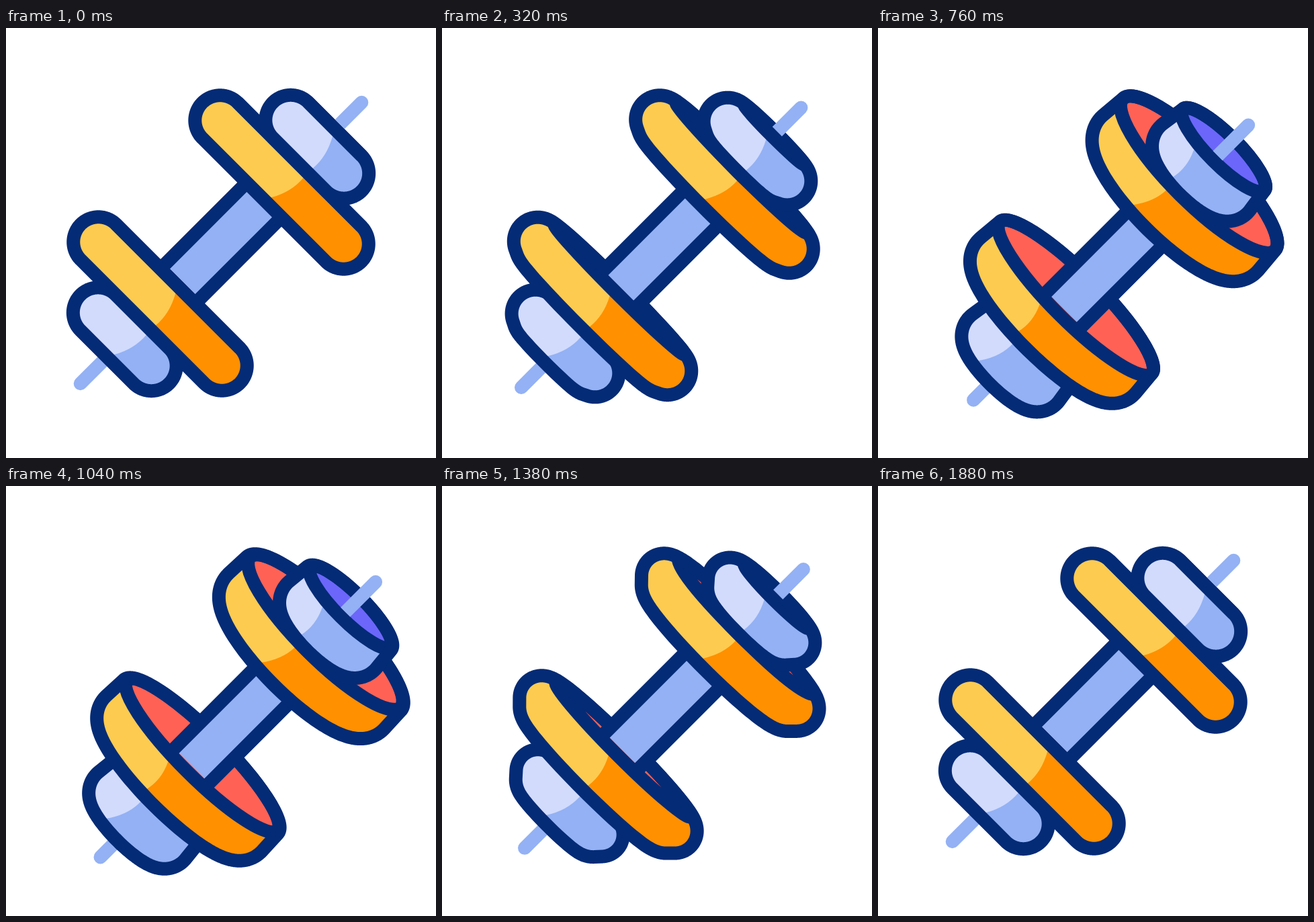
Animation of 640x640 px, one loop 2.4 s. Source, as an HTML page with a canvas:

```html
<!DOCTYPE html>
<html lang="en">
<head>
<meta charset="utf-8">
<title>Dumbbell</title>
<style>
  html, body { margin: 0; width: 100%; height: 100%; overflow: hidden; background: #fff; }
  canvas { display: block; }
</style>
</head>
<body>
<canvas id="stage" width="640" height="640"></canvas>
<script>
const ctx = document.getElementById('stage').getContext('2d');
const LOOP = 2400, TURNED = 800, BACK = 1880;
const SHIFT = 39.5, LINE = 20, R = 37.3;   // R: corner radius of a plate seen from the side
const NAVY = '#042b76', BLUE = '#93b1f4', PALE = '#d2dbfc';
const YELLOW = '#fdcb50', ORANGE = '#ff9000', RED = '#ff6254', PURPLE = '#6c66fb';

// u runs along the bar, v across it.
// u: centre seen from the side, h: half length without the corners,
// back: rear edge when turned, tilt: width / height of the turned discs
const small = { h: 56, light: PALE, dark: BLUE };
const big = { h: 130, light: YELLOW, dark: ORANGE, face: RED };
const smallLeft = { ...small, u: -202.6, back: -257, tilt: 0.22, slant: 13 };
const bigLeft = { ...big, u: -128, back: -181.5, tilt: 0.22, slant: -13 };
const bigRight = { ...big, u: 128, back: 71.5, tilt: 0.26, slant: 13 };
const smallRight = { ...small, u: 202.6, back: 142.5, tilt: 0.26, slant: -13, face: PURPLE };

const mix = (a, b, p) => a + (b - a) * p;

// How far an ellipse at u, grown by r, reaches along a direction, and where
function reach(disc, nu, nv) {
  const s = Math.hypot(disc.w * nu, disc.h * nv) + 1e-6;
  return {
    far: disc.u * nu + s + disc.r,
    u: disc.u + disc.w ** 2 * nu / s + disc.r * nu,
    v: disc.h ** 2 * nv / s + disc.r * nv
  };
}

// Convex outline around two discs
function hull(a, b) {
  const path = new Path2D(), n = 480;
  for (let i = 0; i < n; i++) {
    const angle = (i + 0.5) * 2 * Math.PI / n;
    const nu = Math.cos(angle), nv = Math.sin(angle);
    const p = reach(a, nu, nv), q = reach(b, nu, nv);
    const best = p.far > q.far ? p : q;
    path.lineTo(best.u, best.v);
  }
  path.closePath();
  return path;
}

function drawPlate(plate, p) {
  const left = mix(plate.u - R, plate.back, p);
  const rim = left + 2 * R - 4 * p;
  const tilt = plate.tilt * p;
  const rear = { h: plate.h * (1 - 0.03 * p), r: R };
  rear.w = rear.h * tilt;
  rear.u = left + R + rear.w;
  const front = { h: plate.h + 0.8 * R * p, r: R * (1 - p * p) };
  front.w = front.h * tilt;
  front.u = rim - front.r + front.w;

  const body = hull(rear, front);
  ctx.fillStyle = plate.dark;
  ctx.fill(body);
  drawLight(plate, body, left + LINE / 2, rim - LINE / 2, p);

  if (plate.face) {
    ctx.beginPath();
    ctx.ellipse(rim + front.w, 0, front.w, front.h, 0, 0, 2 * Math.PI);
    ctx.fillStyle = plate.face;
    ctx.fill();
    ctx.stroke();
  }
  ctx.stroke(body);
}

// The lit half ends in a shallow arc that stays put while the plate shifts
function drawLight(plate, body, u1, u2, p) {
  const mid = 11.5 - SHIFT * p, rise = (plate.slant + 7 * p) / 2;
  ctx.save();
  ctx.clip(body);
  ctx.beginPath();
  ctx.moveTo(u1 - 60, -200);
  ctx.lineTo(u1 - 60, mid - rise);
  ctx.lineTo(u1, mid - rise);
  ctx.quadraticCurveTo((u1 + u2) / 2, mid + 9, u2, mid + rise);
  ctx.lineTo(u2 + 120, mid + rise);
  ctx.lineTo(u2 + 120, -200);
  ctx.fillStyle = plate.light;
  ctx.fill();
  ctx.restore();
}

function drawPin(base, tip) {
  ctx.beginPath();
  ctx.moveTo(base, -10);
  ctx.lineTo(tip, -10);
  ctx.arc(tip, 0, 10, -Math.PI / 2, Math.PI / 2, tip < 0);
  ctx.lineTo(base, 10);
  ctx.fillStyle = BLUE;
  ctx.fill();
}

function drawBar(p) {
  const left = mix(-80.7, -100, p), right = mix(90.7, 71, p), side = 36.6;
  ctx.fillStyle = BLUE;
  ctx.fillRect(left, -side, right - left, 2 * side);
  ctx.beginPath();
  for (const v of [-side, side]) {
    ctx.moveTo(left - 2, v);
    ctx.lineTo(right, v);
  }
  ctx.stroke();
}

// Symmetric cubic-bezier(a, 0, 1 - a, 1)
function ease(x, a) {
  let lo = 0, hi = 1, s;
  for (let i = 0; i < 24; i++) {
    s = (lo + hi) / 2;
    const r = 1 - s;
    if (3 * a * s * r * r + 3 * (1 - a) * s * s * r + s ** 3 < x) lo = s; else hi = s;
  }
  return s * s * (3 - 2 * s);
}

function turnAt(t) {
  if (t < TURNED) return ease(t / TURNED, 0.7);
  if (t < BACK) return 1 - ease((t - TURNED) / (BACK - TURNED), 0.66);
  return 0;
}

function draw(t) {
  const p = turnAt(t), k = Math.SQRT1_2;
  ctx.setTransform(1, 0, 0, 1, 0, 0);
  ctx.fillStyle = '#fff';
  ctx.fillRect(0, 0, 640, 640);
  ctx.setTransform(k, -k, k, k, 320, 320);
  ctx.translate(0, SHIFT * p);
  ctx.lineWidth = LINE;
  ctx.lineJoin = 'round';
  ctx.strokeStyle = NAVY;

  drawPin(-240, mix(-296, -291, p));
  drawPlate(smallLeft, p);
  drawPlate(bigLeft, p);
  drawBar(p);
  drawPlate(bigRight, p);
  drawPlate(smallRight, p);
  drawPin(mix(250, 223, p), mix(296, 287.5, p));
}

const start = performance.now();
function tick() {
  draw((performance.now() - start) % LOOP);
  requestAnimationFrame(tick);
}
tick();
</script>
</body>
</html>
```
